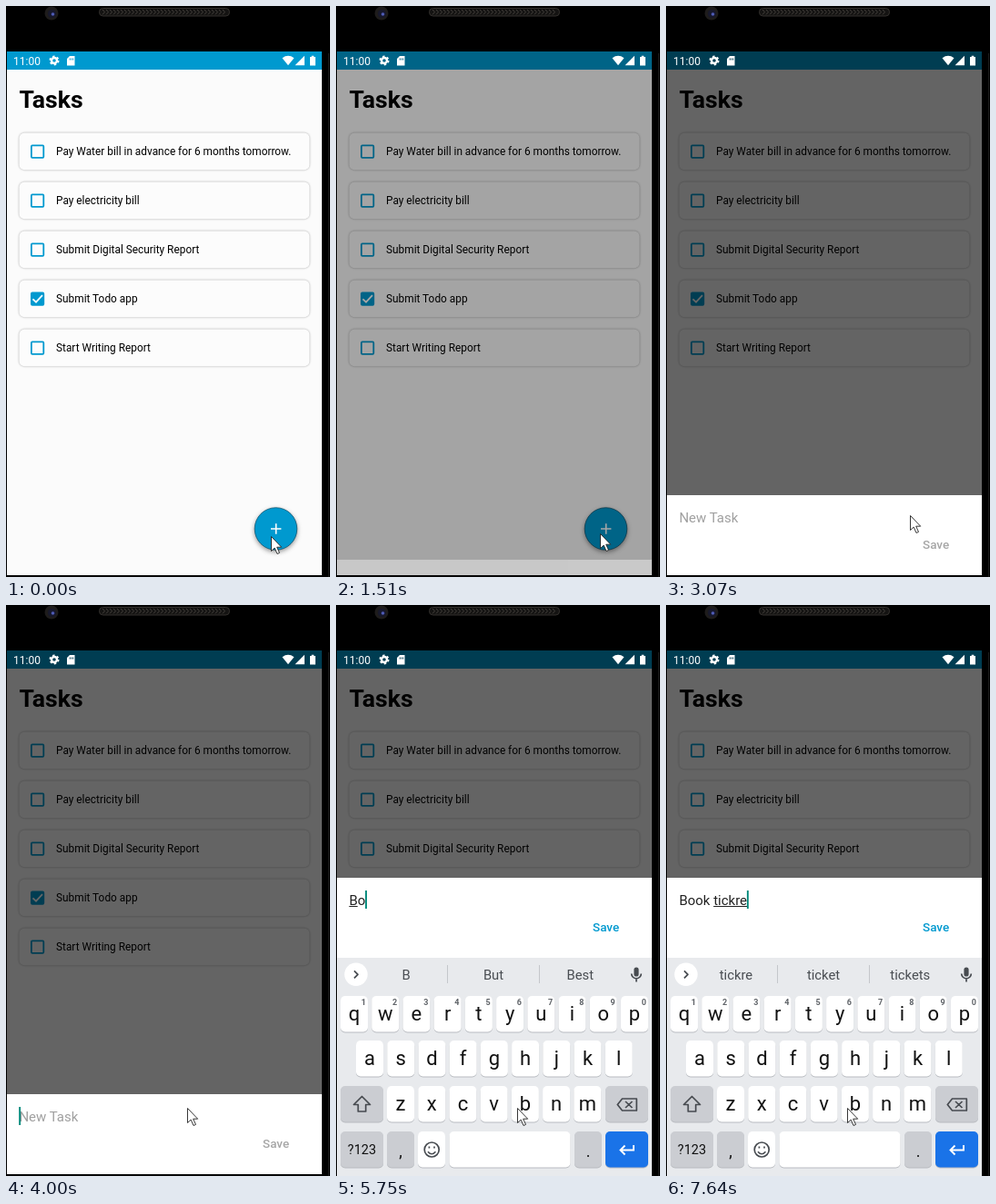
Recreate the animation shown at these times as an HTML page. Size 356 px wide and 628 px high, loop 8000 ms.

```html
<!DOCTYPE html>
<html lang="en">
<head>
<meta charset="utf-8">
<title>Tasks</title>
<style>
  html, body { margin: 0; width: 100%; height: 100%; overflow: hidden; background: #000; }
  svg { display: block; width: 100vw; height: 100vh; }
  text { font-family: Roboto, "Open Sans", sans-serif; white-space: pre; }
  .line { fill: none; stroke: #474b50; stroke-width: 1.7; stroke-linejoin: round; }
  .mid { text-anchor: middle; }
  .card { fill: #fcfcfc; filter: drop-shadow(0 .8px 1.2px #0005); }
</style>
</head>
<body>
<svg viewBox="0 0 356 628">
  <defs><clipPath id="screen"><path d="M1 50H347V626H1z"/></clipPath></defs>
  <rect width="356" height="628"/>
  <path d="M354.5 52V628" stroke="#1b1b1b"/>
  <circle cx="50" cy="8" r="7.5" fill="#1e1c1b"/>
  <circle cx="50.5" cy="8.5" r="4.5" fill="#17182c"/>
  <circle cx="51.5" cy="9" r="1.8" fill="#4f5bb5"/>
  <rect x="102.5" y="2.5" width="143" height="8.5" rx="4" fill="#141312" stroke="#34312e"/>
  <path id="grille" fill="none" stroke="#45413d"/>
  <g clip-path="url(#screen)">
    <rect x="1" y="50" width="346" height="576" fill="#fbfbfb"/>
    <rect x="1" y="50" width="346" height="20" fill="#0099cf"/>
    <text x="14.5" y="112" font-size="26.6" font-weight="700">Tasks</text>
    <g id="cards"></g>
    <circle cx="296.5" cy="575" r="23.3" fill="#0099cf" stroke="#064b66" stroke-width=".7" style="filter:drop-shadow(0 2px 2.5px #0006)"/>
    <path d="M291 575H302.4M296.7 569.3V580.7" stroke="#fff" stroke-width="1.6"/>
    <rect id="dim" x="1" y="50" width="346" height="576"/>
    <g fill="#fff">
      <text x="8" y="65" font-size="12">11:00</text>
      <circle cx="53" cy="60" r="3" fill="none" stroke="#fff" stroke-width="2.4"/>
      <circle cx="53" cy="60" r="4.6" fill="none" stroke="#fff" stroke-width="1.8" stroke-dasharray="2.4 2.417"/>
      <path fill-rule="evenodd" d="M70 55H75.5V65.5H67V58zM69.7 57.5V59.5H70.6V57.5zM71.5 57.5V59.5H72.4V57.5zM73.3 57.5V59.5H74.2V57.5z"/>
      <path d="M303.5 57.3Q310 52.4 316.5 57.3L310 65.3z"/>
      <path d="M328 54.8V65.3H317.6z"/>
      <path d="M334 56H335.7V54.7H338.3V56H340V65.5H334z"/>
    </g>
    <g id="sheet">
      <rect x="1" width="346" height="340" fill="#fff"/>
      <text id="entry" x="14.4" y="29.6" font-size="15"></text>
      <path id="underline" stroke="#222"/>
      <rect id="caret" y="14" width="1.9" height="20" fill="#00897b"/>
      <text id="save" x="282" y="59" font-size="13.5" font-weight="500">Save</text>
    </g>
  </g>
  <g id="keyboard">
    <rect x="1" y="388" width="346" height="240" fill="#e8eaed"/>
    <g id="keys"></g>
    <circle cx="22" cy="406.3" r="12.7" fill="#fff"/>
    <path id="chevron" class="line"/>
    <g id="tools" class="line">
      <circle cx="66.8" cy="404.6" r="4.4"/><path d="M70 408L75.3 413"/>
      <path d="M114 400H122.5Q124.5 400 124.5 402V408.5L120.5 412.5H114Q112 412.5 112 410.5V402Q112 400 114 400zM124.5 408.5H120.5V412.5M114.8 406.5Q118 410.5 121.3 406.5M115.7 403V404.6M120.7 403V404.6"/>
      <path d="M212.5 401H223.7V413.3H212.5zM215.5 400V403H220.7V400zM215 406.3H221.5M215 409.7H219.5"/>
      <path d="M248.5 397V416" stroke="#c8cacd" stroke-width="1"/>
      <g fill="#474b50" stroke="none">
        <text x="167.5" y="410.5" class="mid" font-size="11.5" font-weight="900" letter-spacing=".5">GIF</text>
        <circle cx="274.7" cy="406.5" r="1.7"/><circle cx="280" cy="406.5" r="1.7"/><circle cx="285.3" cy="406.5" r="1.7"/>
      </g>
    </g>
    <g id="hints" class="mid" font-size="14.8" fill="#494d52">
      <path d="M122.5 396V416M223.5 396V416" stroke="#c4c7cb"/>
      <text x="77" y="412"></text><text x="173" y="412"></text><text x="268.3" y="412"></text>
    </g>
    <rect x="327.4" y="398.5" width="5.2" height="10" rx="2.6" fill="#474b50"/>
    <path class="line" d="M324.7 405.5A5.3 5.3 0 0 0 335.3 405.5M330 411V414.5"/>
  </g>
  <path id="pointer" d="M.5 .5V16.5L4.2 13.1 7 19.5 9.5 18.4 6.7 12.2H11.7z" fill="#fff" stroke="#222" stroke-width=".9"/>
</svg>
<script>
const $ = id => document.getElementById(id);
const set = (id, attrs) => { for (const k in attrs) $(id).setAttribute(k, attrs[k]); };

let grille = '';
for (let x = 106; x < 242; x += 4) grille += `M${x} 4l2.5 2.7l-2.5 2.7`;
set('grille', { d: grille });

const tasks = ['Pay Water bill in advance for 6 months tomorrow.', 'Pay electricity bill',
  'Submit Digital Security Report', 'Submit Todo app', 'Start Writing Report'];
$('cards').innerHTML = tasks.map((label, i) => {
  const done = i == 3;
  return `<g transform="translate(0 ${i * 54})">
    <rect class="card" x="14.5" y="139.5" width="319" height="40.7" rx="6"/>
    <rect x="27.9" y="153.4" width="13.4" height="13.4" rx="1" stroke="#0099cf" stroke-width="1.8" fill="${done ? '#0099cf' : 'none'}"/>
    ${done ? '<path d="M29.5 160.4L33 163.7L40 156.2" fill="none" stroke="#fff" stroke-width="1.8"/>' : ''}
    <text x="55" y="164.4" font-size="11.87">${label}</text></g>`;
}).join('');

// Keyboard: a key is a rounded box with a thin lower edge and an optional label
const key = (x, y, w, fill = '#fff', label = '', size = 22, drop = 7) =>
  `<rect x="${x}" y="${y + 1}" width="${w}" height="39.5" rx="5" fill="#b9bcc1"/>
   <rect x="${x}" y="${y}" width="${w}" height="39.5" rx="5" fill="${fill}"/>
   <text class="mid" x="${x + w / 2}" y="${y + 20 + drop}" font-size="${size}" fill="#111">${label}</text>`;
const pitch = 34.22, grey = '#cbcdd2';
let keys = '';
[['qwertyuiop', 5], ['asdfghjkl', 22], ['zxcvbnm', 56]].forEach(([letters, left], row) => {
  [...letters].forEach((c, i) => {
    const x = left + i * pitch, y = Math.floor(430 + row * 49.7);
    keys += key(x, y, 30, '#fff', c);
    if (!row) keys += `<text class="mid" x="${x + 25.3}" y="440" font-size="9" font-weight="700" fill="#5f6368">${(i + 1) % 10}</text>`;
  });
});
keys += key(5, 529, 47, grey) + key(296, 529, 47, grey)
  + key(5, 579, 47, grey, '?123', 14.5, 5) + key(56, 579, 30, grey, ',', 18, 8)
  + key(90, 579, 30) + key(124.5, 579, 133) + key(262, 579, 30, grey, '.', 18, 8)
  + key(296, 579, 47, '#1a73e8')
  + `<path class="line" d="M28.5 540.5L19.5 549.5H24.3V557H32.7V549.5H37.5z
      M314.5 543H330.3V556H314.5L309.3 549.5zM318 546L325.5 553M325.5 546L318 553"/>
    <circle class="line" cx="105.2" cy="599" r="8"/>
    <path class="line" d="M101 601.2Q105.2 606.3 109.4 601.2M102.4 595.5V597.6M108 595.5V597.6"/>
    <path d="M327 594V599.5H313M317.5 594.5L312.5 599.5L317.5 604.5" fill="none" stroke="#fff" stroke-width="1.9"/>`;
$('keys').innerHTML = keys;

const pen = document.createElement('canvas').getContext('2d');
const widthOf = s => { pen.font = '15px Roboto, "Open Sans", sans-serif'; return pen.measureText(s).width; };

// Each row: start time, then the values held until the next row
const pointer = [[0, 291, 583], [150, 290, 583], [430, 290, 580], [3070, 268, 560],
  [3195, 224, 541], [3320, 201, 551], [3470, 199, 553]];
const sheet = [[0, 640, 0, 0], [1260, 640, 0, .06], [1385, 628, .2, .18], [1510, 609, .4, .35],
  [1660, 538, 1, .6], [4280, 300, 1, .6]];
const keyboard = [[0, 260], [4280, 110], [4400, 0]];
const caret = [[0, 0], [3870, .5], [4000, 1], [4520, 0], [5050, 1]];
// Typed text and how much of it, up to which letter, is underlined
const typing = [[0, '', 0], [5050, 'B', 0], [5200, 'B', 1], [5750, 'Bo', 1], [5870, 'Bo', 2],
  [5990, 'Boo', 2], [6110, 'Boo', 3], [6230, 'Book', 3], [6350, 'Book', 4], [6470, 'Book ', 0],
  [6590, 'Book t', 0], [6710, 'Book ti', 6], [6960, 'Book tic', 7], [7085, 'Book tick', 8],
  [7210, 'Book tickr', 9], [7360, 'Book tickre', 10], [7640, 'Book tickre', 11]];
const hints = [[0, ''], [5320, 'B But Best'], [5870, 'Bo Book Box'], [6110, 'Boo Book Books'],
  [6350, 'Book Books Booked'], [6470, 'a the reading'], [6710, 't to the'], [6960, 'ti to time'],
  [7085, 'tic tick ticket'], [7210, 'tick ticket tickets'], [7360, 'tickr ticket tickets'],
  [7640, 'tickre ticket tickets']];
const at = (rows, t) => rows.findLast(r => r[0] <= t).slice(1);

function draw(t) {
  const [px, py] = at(pointer, t), [top, alpha, dim] = at(sheet, t);
  const [text, end] = at(typing, t), [words] = at(hints, t);
  set('pointer', { transform: `translate(${px} ${py})` });
  set('dim', { opacity: dim });
  set('sheet', { transform: `translate(0 ${top})`, opacity: alpha });
  set('keyboard', { transform: `translate(0 ${at(keyboard, t)})` });
  $('entry').textContent = text || 'New Task';
  set('entry', { fill: text ? '#222' : '#a0a0a0' });
  set('save', { fill: text ? '#0099cf' : '#a6a6a6' });
  set('caret', { x: 14.2 + widthOf(text), opacity: at(caret, t) });
  const start = text.lastIndexOf(' ') + 1, edge = n => 14.4 + widthOf(text.slice(0, n));
  set('underline', { d: end ? `M${edge(start)} 31.5H${edge(end)}` : '' });
  set('tools', { display: words ? 'none' : 'inline' });
  set('hints', { display: words ? 'inline' : 'none' });
  set('chevron', { d: words ? 'M20 402.3L24 406.3L20 410.3' : 'M24 402.3L20 406.3L24 410.3' });
  const list = words.split(' ');
  $('hints').querySelectorAll('text').forEach((el, i) => el.textContent = list[i] || '');
}

const begin = performance.now();
function tick() {
  draw((performance.now() - begin) % 8000);
  requestAnimationFrame(tick);
}
tick();
</script>
</body>
</html>
```
